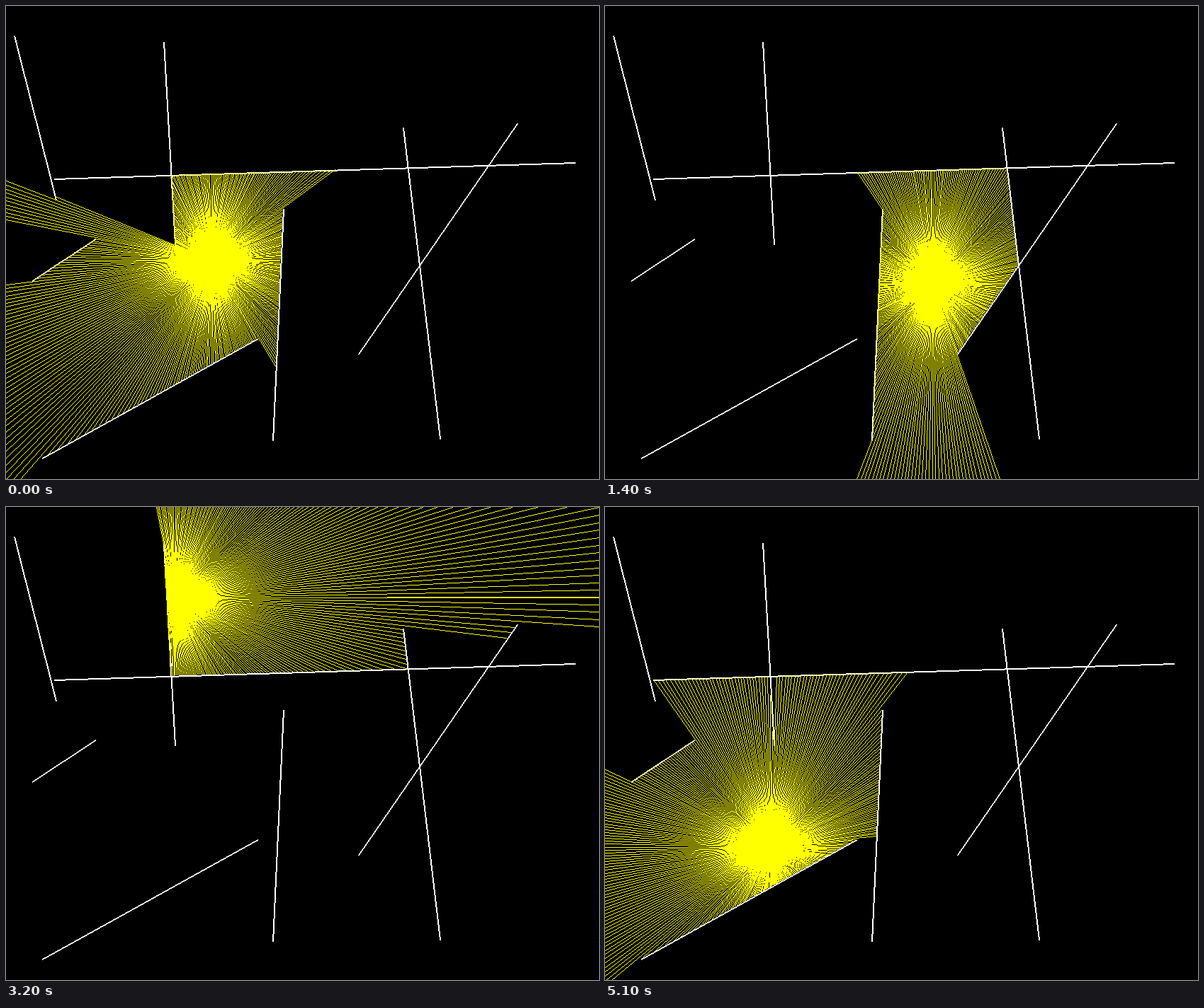
An HTML page with a canvas that plays this animation: 837x669 px, repeating every 5.2 s.

```html
<!DOCTYPE html>
<html lang="en">
<head>
<meta charset="utf-8">
<title>Ray casting</title>
<style>
  html, body { margin: 0; height: 100%; overflow: hidden; background: #000; }
  canvas { display: block; }
</style>
</head>
<body>
<canvas id="stage" width="837" height="669"></canvas>
<script>
const W = 837, H = 669, STEP = 100, LOOP = 5200;
const BLACK = 0xff000000, WHITE = 0xffffffff, YELLOW = 0xff00ffff;

// x1, y1, x2, y2
const walls = [
  [11, 42, 70, 274],
  [222, 51, 238, 337],
  [68, 244, 803, 221],
  [560, 172, 612, 612],
  [721, 166, 497, 492],
  [391, 287, 376, 614],
  [37, 388, 126, 329],
  [51, 639, 355, 470]
];

// Path of the light: step, x, y
const path = [
  [0, 290, 359], [4, 318, 388], [8, 350, 421], [10, 382, 414], [12, 420, 408],
  [13, 441, 391], [14, 462, 392], [16, 492, 345], [18, 524, 302], [20, 566, 268],
  [22, 612, 247], [23, 622, 222], [24, 612, 206], [25, 575, 208], [26, 515, 206],
  [28, 390, 165], [30, 285, 130], [32, 237, 128], [34, 195, 135], [36, 152, 152],
  [38, 114, 205], [40, 80, 272], [41, 57, 298], [42, 62, 325], [44, 71, 367],
  [45, 80, 386], [46, 105, 436], [47, 145, 458], [48, 175, 462], [51, 234, 481]
];

const ctx = document.getElementById('stage').getContext('2d');
const image = ctx.createImageData(W, H);
const pixels = new Uint32Array(image.data.buffer);

function plot(x, y, color) {
  if (x >= 0 && y >= 0 && x < W && y < H) pixels[y * W + x] = color;
}

// Bresenham line with hard edges
function line(x, y, x2, y2, color) {
  const dx = Math.abs(x2 - x), dy = Math.abs(y2 - y);
  const sx = x < x2 ? 1 : -1, sy = y < y2 ? 1 : -1;
  let err = dx - dy;
  for (let left = Math.max(dx, dy); left >= 0; left--) {
    plot(x, y, color);
    const e = 2 * err;
    if (e > -dy) { err -= dy; x += sx; }
    if (e < dx) { err += dx; y += sy; }
  }
}

function drawWall([x1, y1, x2, y2]) {
  const steep = Math.abs(y2 - y1) > Math.abs(x2 - x1);
  const ox = steep ? 1 : 0, oy = 1 - ox;
  line(x1, y1, x2, y2, WHITE);
  line(x1 + ox, y1 + oy, x2 + ox, y2 + oy, WHITE);
}

// Distance along the ray to a wall, or Infinity
function hit(px, py, dx, dy, [x1, y1, x2, y2]) {
  const wx = x2 - x1, wy = y2 - y1;
  const det = dx * wy - dy * wx;
  if (!det) return Infinity;
  const t = ((x1 - px) * wy - (y1 - py) * wx) / det;
  const u = ((x1 - px) * dy - (y1 - py) * dx) / det;
  return t > 0 && u >= 0 && u <= 1 ? t : Infinity;
}

// Distance to the stage edge along one axis
function toEdge(pos, dir, size) {
  if (!dir) return Infinity;
  return (dir > 0 ? size - pos : -pos) / dir;
}

function castRay(px, py, angle) {
  const dx = Math.cos(angle), dy = Math.sin(angle);
  let t = Math.min(toEdge(px, dx, W), toEdge(py, dy, H));
  for (const wall of walls) t = Math.min(t, Math.max(0, hit(px, py, dx, dy, wall) - 0.7));
  line(px, py, Math.trunc(px + dx * t), Math.trunc(py + dy * t), YELLOW);
}

function lightAt(step) {
  const i = path.findIndex(p => p[0] >= step);
  const b = path[i], a = path[Math.max(0, i - 1)];
  const k = b === a ? 0 : (step - a[0]) / (b[0] - a[0]);
  return [1, 2].map(n => Math.round(a[n] + (b[n] - a[n]) * k));
}

function draw(step) {
  const [x, y] = lightAt(step);
  pixels.fill(BLACK);
  walls.forEach(drawWall);
  for (let deg = 0; deg <= 360; deg++) castRay(x, y, deg * Math.PI / 180);
  ctx.putImageData(image, 0, 0);
}

let start = null, shown = 0;
function tick(now) {
  if (start === null) start = now;
  const step = Math.floor(((now - start) % LOOP) / STEP);
  if (step !== shown) draw(shown = step);
  requestAnimationFrame(tick);
}
draw(0);
requestAnimationFrame(tick);
</script>
</body>
</html>
```
